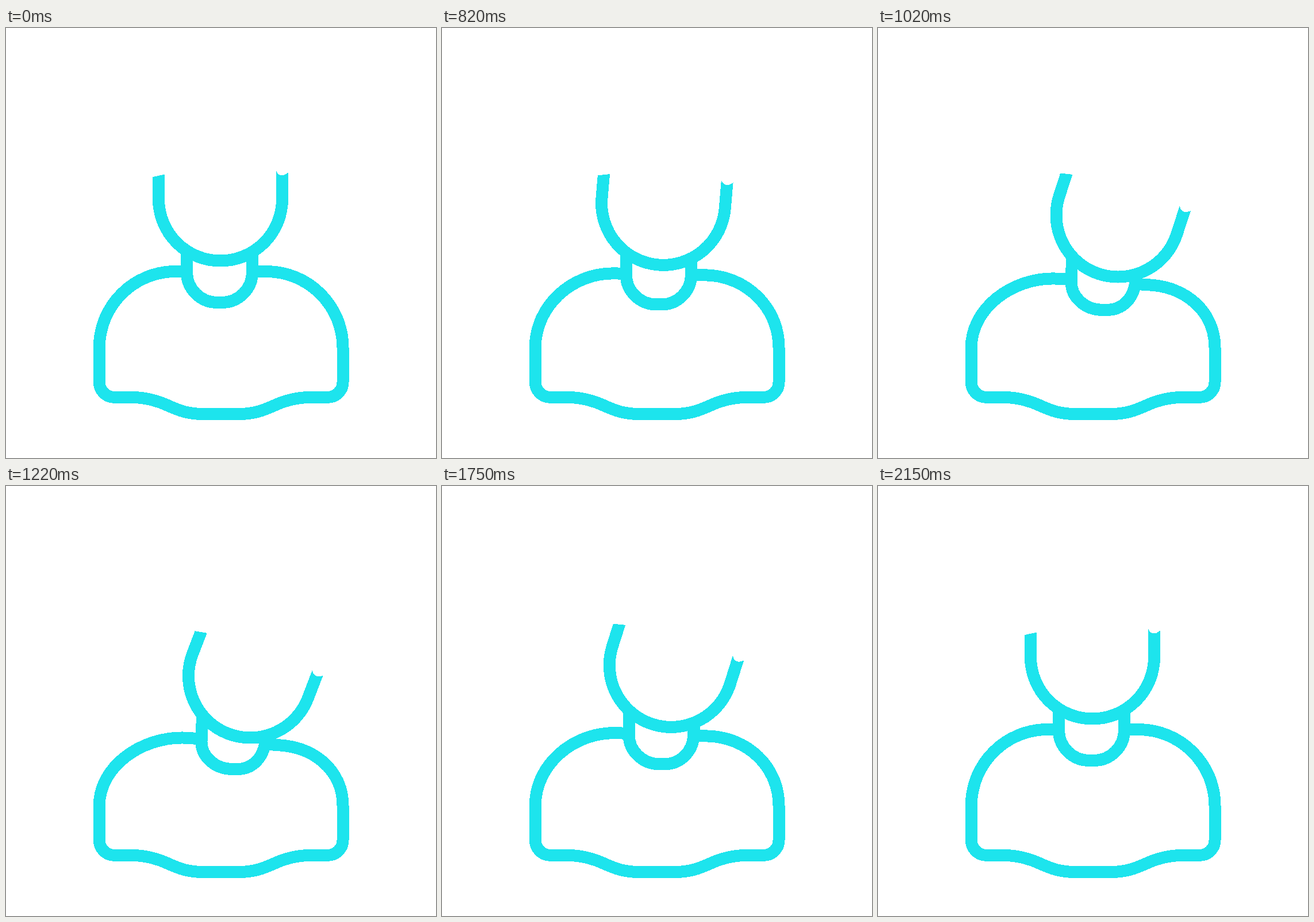
Write an HTML page that moves like this. It is 748x748 px and loops after 2170 ms.

```html
<!DOCTYPE html>
<html lang="en">
<head>
<meta charset="utf-8">
<title>Bowing figure</title>
<style>
  html, body { margin: 0; width: 100%; height: 100%; overflow: hidden; background: #fff; }
  svg { display: block; width: 100vw; height: 100vh; shape-rendering: crispEdges; }
  .line { fill: none; stroke: #1de4ed; stroke-width: 21; stroke-linejoin: round; }
  .blank { fill: #fff; }
</style>
</head>
<body>
<svg viewBox="0 0 748 748">
  <path id="body" class="line"/>
  <path id="neck" class="line"/>
  <g id="head">
    <path class="line" style="fill:#fff" d="M-107.5 -46V0A107.5 107.5 0 0 0 107.5 0V-50.5"/>
    <path class="blank" d="M-120 -38L-96 -43V-52H-120Z"/>
    <path class="blank" d="M96.5 -51Q99 -41 108 -41Q113 -41.5 119.5 -47.5V-56H96.5Z"/>
  </g>
</svg>
<script>
const LOOP = 2170, MOVE = 530;
const $ = id => document.getElementById(id);

// Each shape as [upright, bowed]; both strings hold the same commands.
const hem = 'L162.3 616C162.3 630.4 173.9 642.3 188.3 642.3L217 642.3C243 642.3 263 648 283 657.3' +
  'C302 666 318 671.6 345 671.6L403 671.6C430 671.6 446 666 465 657.3' +
  'C485 648 505 642.3 531 642.3L560 642.3C574.4 642.3 586 630.4 586 616L586 556';
const torso = [
  `M312 423.5L295 423.5C221.8 423.5 162.3 483 162.3 556${hem}C586 483 526.2 423.5 453 423.5L430 423.5`,
  `M335 439.5L308 438C235 437 162.3 488 162.3 556${hem}C586 498 540 453 470 450.5L452 449`
];
const collar = [
  'M314.5 388L314.5 424.5C314.5 453.8 338.2 477.5 367.5 477.5L375.5 477.5C404.8 477.5 428.5 453.8 428.5 424.5L428.5 388',
  'M341.5 398L340 444C339 470 363.5 492.5 394 492.5L403 492.5C428 492.5 446 474 450.5 449L452 436'
];

const mix = (a, b, k) => a + (b - a) * k;

function blend([from, to], k) {
  const ends = to.match(/[\d.]+/g);
  let i = 0;
  return from.replace(/[\d.]+/g, n => mix(+n, +ends[i++], k).toFixed(2));
}

// Cubic ease with handles at (1/3, 0) and (1/3, 1).
function ease(x) {
  if (x <= 0) return 0;
  if (x >= 1) return 1;
  let lo = 0, hi = 1;
  for (let i = 0; i < 24; i++) {
    const s = (lo + hi) / 2;
    if (s * (1 - s) + s ** 3 < x) lo = s; else hi = s;
  }
  return lo * lo * (3 - 2 * lo);
}

const ramp = (t, start) => ease((t - start) / MOVE);

function draw(now) {
  const raw = now % LOOP;
  const t = Math.floor(raw / 50) * 50 + (raw % 50 >= 20 ? 20 : 0);
  const down = ramp(t, 690);
  const lean = down - ramp(t, 1530);
  const tilt = down - ramp(t, 1640); // the head turns back a little later

  $('body').setAttribute('d', blend(torso, lean));
  $('neck').setAttribute('d', blend(collar, lean));
  $('head').setAttribute('transform',
    `translate(${mix(373, 416, lean)} ${mix(322.5, 353.8, lean)}) rotate(${21 * tilt}) translate(0 -25)`);
}

function tick() {
  draw(performance.now());
  requestAnimationFrame(tick);
}
tick();
</script>
</body>
</html>
```
